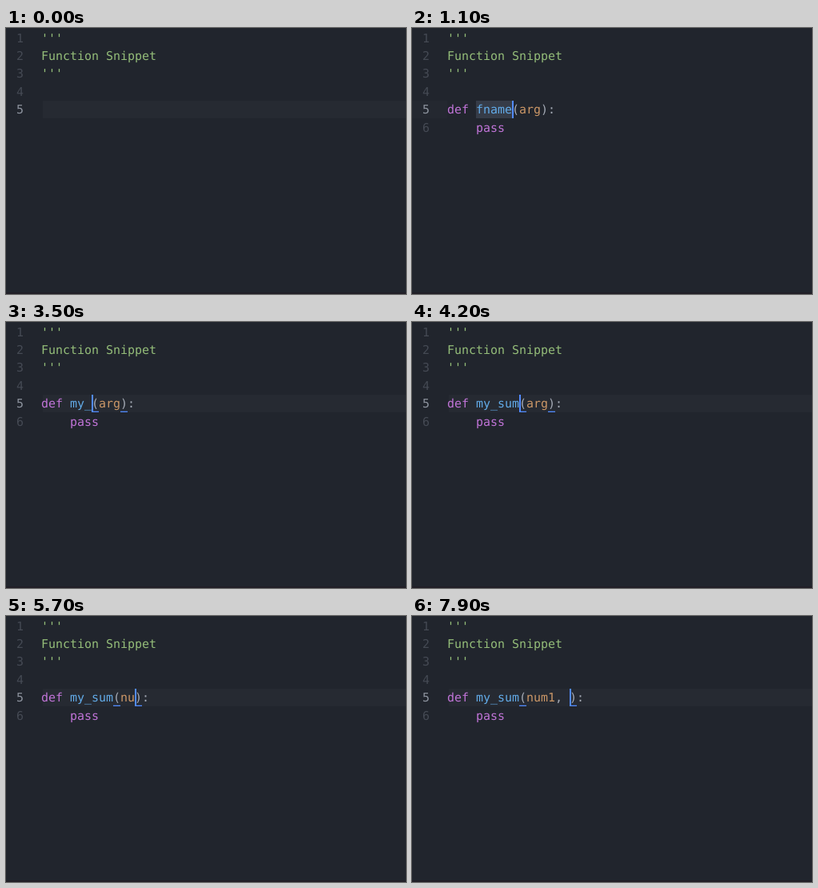
These frames come from a looping animation (500x333 px, 8000 ms). An HTML page:

```html
<!DOCTYPE html>
<html lang="en">
<head>
<meta charset="utf-8">
<title>Function snippet</title>
<style>
html, body { margin: 0; width: 100%; height: 100%; overflow: hidden; background: #21252d; }
svg { display: block; width: 100vw; height: 100vh; }
text {
  font: 14.95px "DejaVu Sans Mono", "Liberation Mono", monospace;
  white-space: pre;
  text-rendering: geometricPrecision;
}
text.hint { font-size: 13.5px; }
text.match { font-weight: bold; }
</style>
</head>
<body>
<svg id="stage" viewBox="0 0 500 333" preserveAspectRatio="none"></svg>
<script>
const LOOP = 8000, LEFT = 44, CELL = 9, ROW = 22.45, POPUP_Y = 113.5, ITEM = 30;
const color = {
  back: '#21252d', line: '#262a32', gutter: '#242830', select: '#363c48',
  dim: '#454a54', number: '#8d939e', plain: '#a5abb6', green: '#94bd79',
  purple: '#c174d8', blue: '#62abe8', orange: '#cb9767', cursor: '#528bff'
};

const items = {
  dc: 'Dictionary Comprehension', debug: 'debug', def: 'New Function',
  defs: 'New Method', ne: 'New Expression'
};

// Each entry changes part of the editor state at its time in ms.
const steps = [
  [0, { word: '', name: null, arg: 'arg', caret: 0, on: 0, select: 0, popup: null }],
  [100, { word: 'd', caret: 1, on: 1 }],
  [200, { popup: ['dc', 'debug', 'def', 'defs'] }],
  [300, { word: 'de', caret: 2, popup: ['debug', 'def', 'defs'] }],
  [400, { word: 'def', caret: 3 }],
  [500, { popup: ['def', 'defs'] }],
  [800, { on: 0 }],
  [1100, { word: '', name: 'fname', caret: 9, on: 1, select: 5, popup: null }],
  [1500, { on: 0.5 }],
  [1600, { on: 0 }],
  [2100, { on: 1 }],
  [2600, { on: 0 }],
  [2700, { name: 'm', caret: 5, on: 1, select: 0 }],
  [2900, { name: 'my', caret: 6 }],
  [3300, { on: 0 }],
  [3400, { name: 'my_', caret: 7, on: 1 }],
  [3700, { name: 'my_s', caret: 8 }],
  [3900, { name: 'my_su', caret: 9 }],
  [4100, { name: 'my_sum', caret: 10 }],
  [4500, { caret: 14, select: 3 }],
  [4900, { on: 0 }],
  [5200, { arg: 'n', caret: 12, on: 1, select: 0 }],
  [5300, { popup: ['ne'] }],
  [5500, { arg: 'nu', caret: 13 }],
  [5600, { popup: null }],
  [6000, { arg: 'num', caret: 14 }],
  [6500, { on: 0 }],
  [6800, { arg: 'num1', caret: 15, on: 1 }],
  [7200, { on: 0 }],
  [7700, { arg: 'num1,', caret: 16, on: 1 }],
  [7900, { arg: 'num1, ', caret: 17 }]
];

const rect = (x, y, w, h, fill, more = '') =>
  `<rect x="${x}" y="${y}" width="${w}" height="${h}" fill="${fill}" ${more}/>`;
const text = (x, y, str, fill, cls = '') =>
  `<text x="${x}" y="${y}" fill="${fill}" class="${cls}">${str}</text>`;
const colX = col => LEFT + col * CELL;
const baseline = row => 17.5 + row * ROW;
const code = (col, row, str, fill) => text(colX(col), baseline(row), str, fill);

function drawPopup(state) {
  const typed = state.name ? state.arg[0] : state.word;
  const x = colX(state.name ? 11 : 0);
  const list = state.popup;
  const longest = Math.max(...list.map(key => key.length));
  const hintX = x + longest * CELL + 14;
  const right = hintX + Math.max(...list.map(key => items[key].length)) * 8.13 + 16;
  const left = x - 42, height = list.length * ITEM;
  let out = rect(left, POPUP_Y, right - left + 2, height + 2, '#191c24', 'rx="3"');
  list.forEach((key, i) => {
    const top = POPUP_Y + i * ITEM, mid = top + ITEM / 2;
    const match = key.startsWith(typed) ? typed.length : 1;
    if (!i) out += rect(left + 31, top, right - left - 31, ITEM, '#2d313b');
    out += rect(left, top, 31, ITEM, i ? '#343b42' : '#434c4b');
    out += `<path d="M${left + 7} ${mid}h8" stroke="${color.green}" stroke-width="2.6"/>` +
      `<path d="M${left + 12} ${mid - 5}l6 5l-6 5z" fill="${color.green}"/>` +
      rect(left + 20.5, mid - 5, 2.4, 10, color.green);
    out += text(x, mid + 4.8, key.slice(0, match), '#f4f5f7', 'match');
    out += text(x + match * CELL, mid + 4.8, key.slice(match), i ? '#a9afba' : '#d3d7de');
    out += text(hintX, mid + 4, items[key], i ? '#656b77' : '#8d939e', 'hint');
  });
  return out;
}

function drawCode(state) {
  const { name, arg } = state;
  if (!name) return code(0, 4, state.word, state.word === 'def' ? color.purple : color.plain);
  const open = 4 + name.length, close = open + 1 + arg.length;
  const [value, rest] = arg.split(/(?=,)/);
  let out = code(0, 4, 'def', color.purple) + code(4, 4, name, color.blue) +
    code(open, 4, '(', color.plain) + code(open + 1, 4, value, color.orange) +
    code(open + 1 + value.length, 4, (rest || '') + '):', color.plain) +
    code(4, 5, 'pass', color.purple);
  if (!state.select && (state.caret === open || state.caret === close)) {
    for (const col of [open, close]) out += rect(colX(col), 111.7, CELL, 1.3, color.cursor);
  }
  return out;
}

function draw(ms) {
  const state = {};
  for (const [at, change] of steps) if (at <= ms) Object.assign(state, change);
  let out = rect(0, 0, 500, 333, color.back) + rect(0, 331, 500, 2, '#211f27');
  if (state.select) {
    out += rect(0, 91, 44, 22, color.gutter);
    out += rect(colX(state.caret - state.select), 91, state.select * CELL, 22, color.select);
  } else {
    out += rect(46, 91, 454, 22, color.line);
  }
  for (let i = 0; i < (state.name ? 6 : 5); i++) {
    out += text(13, baseline(i), i + 1, i === 4 ? color.number : color.dim);
  }
  ["'''", 'Function Snippet', "'''"].forEach((str, i) => { out += code(0, i, str, color.green); });
  out += drawCode(state);
  out += rect(colX(state.caret), 91, 2, 22, color.cursor, `opacity="${state.on}"`);
  if (state.popup) out += drawPopup(state);
  return out;
}

const stage = document.getElementById('stage');
const start = performance.now();
let shown = '';
function tick() {
  const picture = draw((performance.now() - start) % LOOP);
  if (picture !== shown) stage.innerHTML = shown = picture;
  requestAnimationFrame(tick);
}
tick();
</script>
</body>
</html>
```
